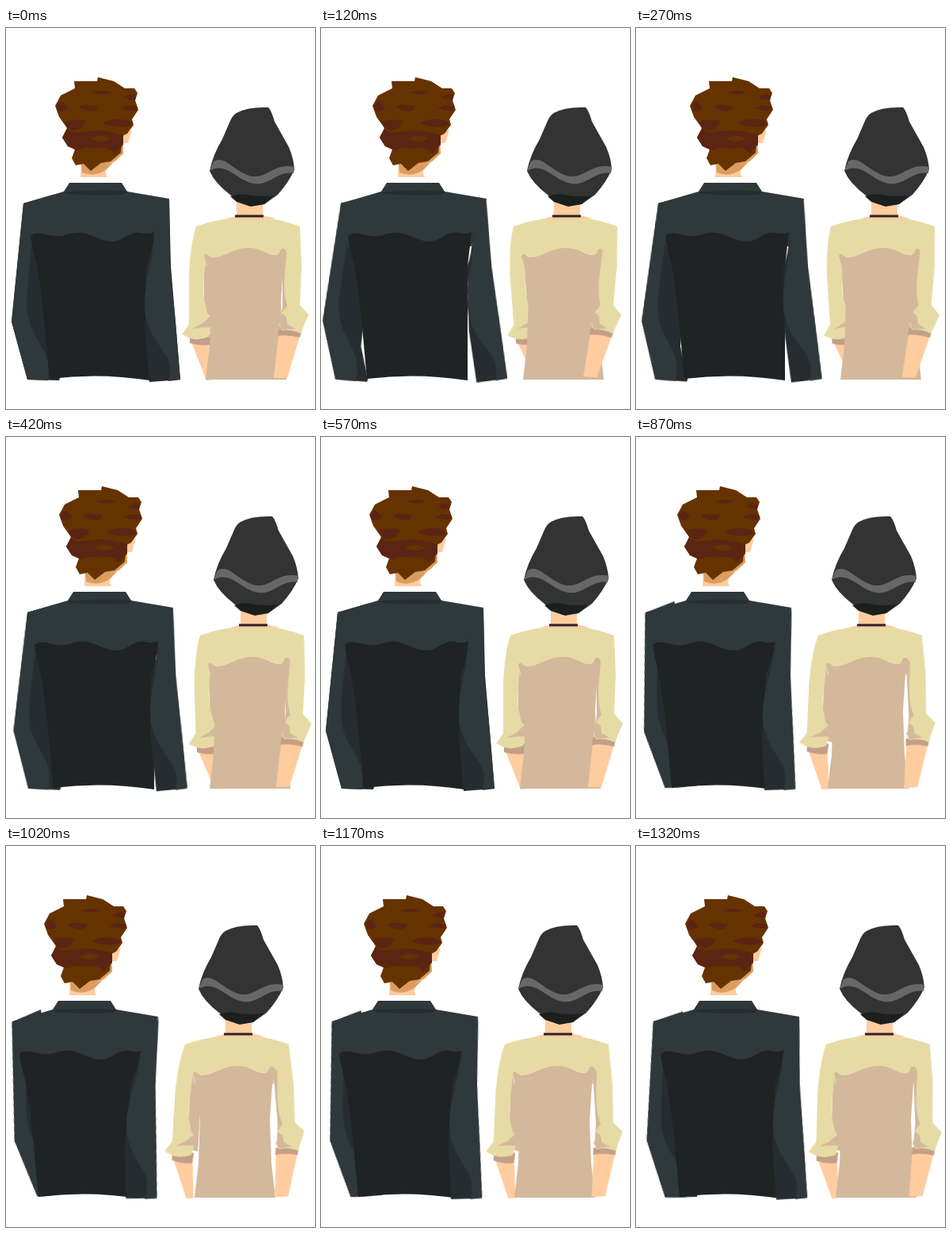
An HTML page for the animation above (1350 ms loop, 390 px wide and 480 px high).

```html
<!DOCTYPE html>
<html lang="en">
<head>
<meta charset="utf-8">
<title>Walking couple</title>
<style>
  html, body { margin: 0; width: 100%; height: 100%; overflow: hidden; background: #fff; }
  svg { display: block; width: 390px; height: 480px; }
  .hair { fill: #663300; }
  .lock { fill: #5c2413; }
  .skin { fill: #ffcc9f; }
  .tone { fill: #db9c60; }
  .coat { fill: #2f383b; }
  .fold { fill: #262c2f; }
  .back { fill: #1f2323; }
  .cream { fill: #e7dba5; }
  .tan { fill: #d4b89b; }
  .cuff { fill: #c29f86; }
  .bob { fill: #333; }
  .band { fill: #676767; }
  .nape { fill: #1b1f1e; }
</style>
</head>
<body>
<svg viewBox="0 0 390 480">
  <g id="pair">
    <!-- man -->
    <g id="manLeft">
      <path class="fold" d="M22 221L60 210L62 300L57 400L68 441L67 444L27 443L7 370Z"/>
      <path class="coat" d="M22 221L60 210L33 262C31 300 24 340 27 358C30 383 46 398 52 416Q55 428 53 444L27 443L7 370Z"/>
    </g>
    <path class="coat" d="M22 221L73 206L80 195H146L153 206L206 215L187 275L31 275Z"/>
    <path class="fold" d="M72 207Q112 203 154 206L149 210Q112 212 77 209Z"/>
    <path class="back" d="M31 262C38 255 48 260 60 262C75 264 80 256 96 258C112 261 120 269 135 269C150 268 154 256 170 258Q180 261 187 257L182 300L182 444Q118 434 55 442C50 390 47 345 40 305C38 290 33 280 31 262Z"/>
    <g id="manRight">
      <path class="fold" d="M206 216L208 300L220 443L181 446L175 380L177 300Q184 285 187 257Z"/>
      <path class="coat" d="M206 215L207 300L214 370L220 443L205 445C208 432 207 420 201 411C186 390 175 372 175 352C175 310 185 300 187 257Z"/>
    </g>
    <path class="skin" d="M95 168L128 160L126 184L128 188H94Z"/>
    <path class="tone" d="M95 171L128 166L146 158L127 178Q112 189 96 182Z"/>
    <path class="skin" d="M126 150L154 130L159 128L154 145H148L148 158L138 168L126 173Z"/>
    <path class="tone" d="M126 158L147 146L148 158L138 167L126 173Z"/>
    <path class="hair" d="M86 67L115 67L116 62L136 67L150 76L162 76L166 82L163 91L167 103L159 115L161 122L153 133L147 136L145 157L132 168L120 170L107 180L98 171L88 173L83 164L87 153L78 149L71 138L77 126L67 112L62 98L69 85L87 76Z"/>
    <g class="lock">
      <path d="M71 138L77 127C85 134 94 131 104 130C120 127 136 132 148 135V147L137 158C125 145 119 155 105 151C97 149 93 157 85 152L78 149Z"/>
      <path d="M64 98L69 92Q77 97 78 102Q72 106 65 104Z"/>
      <path d="M92 99C99 94 109 99 117 98L113 104Q101 107 92 99Z"/>
      <path d="M109 81Q121 77 134 81Q122 86 109 81Z"/>
      <path d="M148 88Q157 81 164 85L163 91Q155 91 148 88Z"/>
      <path d="M144 101L153 97L166 99L164 104Q154 105 144 101Z"/>
      <path d="M74 118Q88 113 101 117Q97 128 85 129L77 126Z"/>
      <path d="M122 120Q137 111 155 117L160 122L152 124Q135 126 122 120Z"/>
    </g>
    <path class="hair" d="M107 139Q119 132 132 139Q120 147 107 139Z"/>

    <!-- woman -->
    <g id="womanLeft">
      <path class="skin" d="M234 396H258L262 443L253 444Z"/>
      <path class="cuff" d="M232 388L259 386L258 399Q244 401 232 397Z"/>
      <path class="tan" d="M250 280L264 290V384L248 381L250 340Z"/>
      <path class="cream" d="M240 250L262 245L252 284C251 310 247 338 252 349Q253 361 258 363L249 371L259 377L256 389Q244 394 232 391L222 386L231 373L231 310Q233 270 240 250Z"/>
      <path class="tan" d="M235 379L250 371L260 377Q246 377 235 379Z"/>
    </g>
    <path class="cream" d="M240 250Q265 241 290 239H327Q350 242 371 250L356 300H252Z"/>
    <path class="tan" d="M250 287C253 280 256 290 262 289C275 289 287 277 307 277C324 277 330 288 342 286C347 284 345 277 350 278Q356 279 354 289L350 300L347 345L349 400L354 443H252L257 400L259 340Q257 310 250 287Z"/>
    <g id="womanRight">
      <path class="skin" d="M344 386L371 388L355 441L338 441Z"/>
      <path class="cuff" d="M344 379L373 382L371 390Q355 386 343 388Z"/>
      <path class="tan" d="M349 279L365 290L362 370L346 373L349 350Z"/>
      <path class="cream" d="M371 250L348 247L354 284C353 300 349 325 353 342L355 350L348 359L354 364L344 373L348 381Q361 379 372 385L376 375L382 361L371 349L373 300Z"/>
      <path class="tan" d="M345 372L354 364L355 373L365 379L348 380Z"/>
    </g>
    <path class="skin" d="M291 219H324V236L340 240Q308 243 278 240L291 237Z"/>
    <path d="M289 237H325" stroke="#2b2424" stroke-width="3"/>
    <path class="bob" d="M291 107Q305 99 331 100Q335 104 339 118L357 150Q363 164 364 178Q358 193 343 210L326 222L306 224L284 211Q263 195 257 180Q261 160 273 140L283 117Q286 110 291 107Z"/>
    <path class="band" d="M257 180L262 168Q270 163 281 171C298 183 307 188 317 187C332 185 342 170 364 175L363 183C346 180 335 194 322 196C304 199 290 183 277 178Q266 174 257 180Z"/>
    <path class="nape" d="M283 212Q297 207 309 211Q323 213 338 211L326 222L309 225L291 219Z"/>
  </g>
</svg>
<script>
  const LOOP = 1350;
  const times = [0, 120, 270, 420, 570, 720, 870, 1020, 1170, 1320];

  // Sideways sway in px, arm swing in degrees.
  const sway = [0, 3, 6, 5, -1, -3, -10, -14, -8, 0];
  const arms = {
    manLeft:    { pivot: [28, 225],  swing: [0, 3.1, 2.3, 1, 0, -2.6, -5.2, -7, -4.9, -2.6] },
    manRight:   { pivot: [200, 225], swing: [0, -3.2, -2.3, -1, 0, 1.2, 2.3, 4.1, 2.3, 1] },
    womanLeft:  { pivot: [246, 252], swing: [0, -4.4, -3.8, -1.6, 0, 1.3, 2.5, 3.4, 2.5, 1.7] },
    womanRight: { pivot: [365, 252], swing: [0, 3, 2.5, 0.7, 0, -2, -3.1, -4.6, -3.5, -2] }
  };

  function play(el, values, format) {
    const steps = values.map((v, i) => ({
      offset: times[i] / LOOP, transform: format(v), easing: 'step-end'
    }));
    steps.push({ offset: 1, transform: format(values[0]) });
    el.animate(steps, { duration: LOOP, iterations: Infinity }).startTime = 0;
  }

  play(document.getElementById('pair'), sway, x => `translateX(${x}px)`);
  for (const [id, { pivot, swing }] of Object.entries(arms)) {
    const el = document.getElementById(id);
    el.style.transformOrigin = pivot.map(v => v + 'px').join(' ');
    play(el, swing, a => `rotate(${a}deg)`);
  }
</script>
</body>
</html>
```
